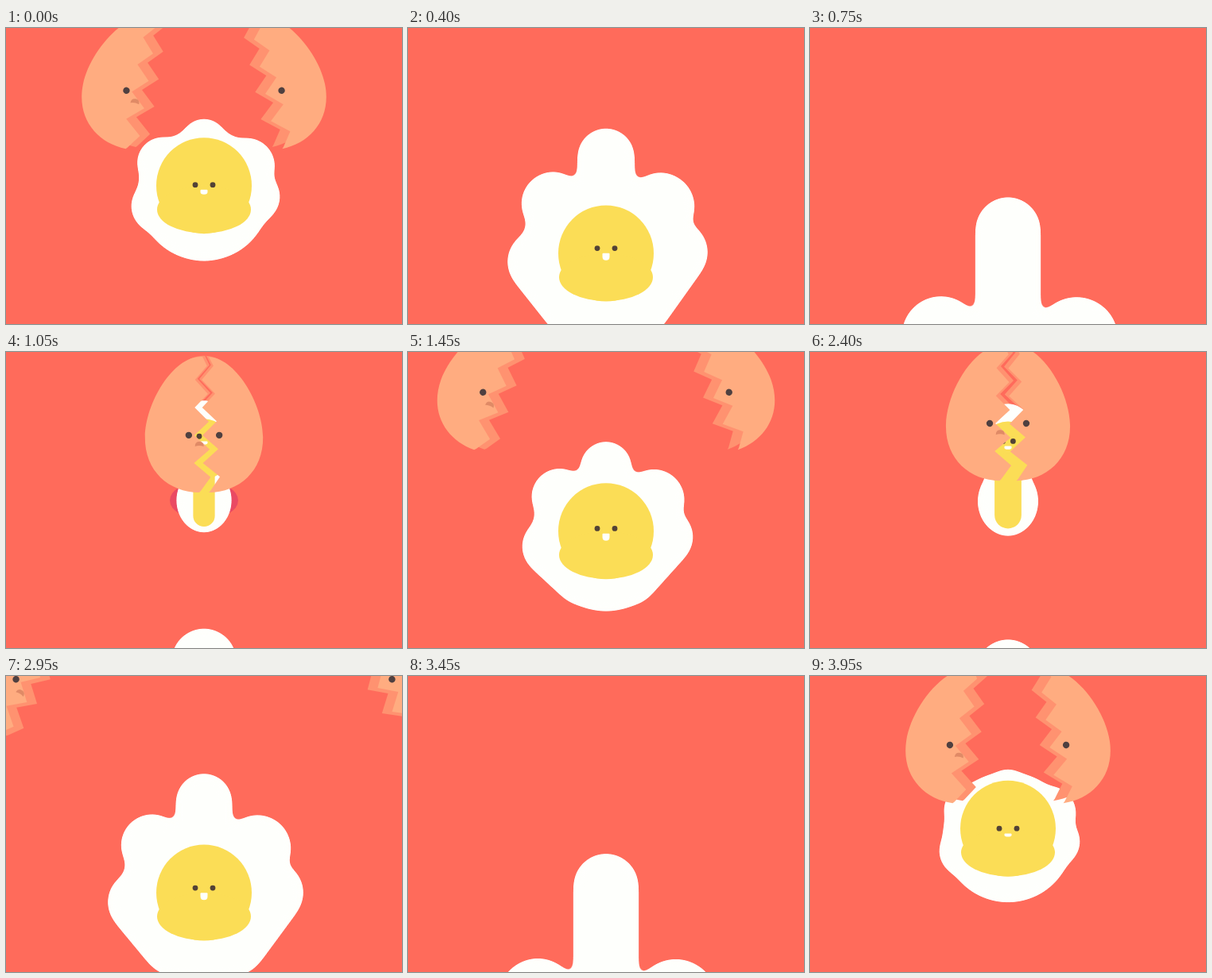
These frames come from a looping animation (498x373 px, 4000 ms). An HTML page:

```html
<!DOCTYPE html>
<html lang="en">
<head>
<meta charset="utf-8">
<title>Cracking egg</title>
<style>
  html, body { margin: 0; width: 100%; height: 100%; overflow: hidden; background: #ff6b5b; }
  svg { display: block; width: 100vw; height: 100vh; }
</style>
</head>
<body>
<svg viewBox="0 0 498 373">
  <defs>
    <filter id="goo" filterUnits="userSpaceOnUse" x="-40" y="-40" width="578" height="470" color-interpolation-filters="sRGB">
      <feGaussianBlur stdDeviation="7"/>
      <feColorMatrix values="1 0 0 0 0  0 1 0 0 0  0 0 1 0 0  0 0 0 20 -9.5"/>
    </filter>
  </defs>
  <g id="backBand"></g>
  <g id="flash"></g>
  <g id="white" filter="url(#goo)" fill="#fefffc" stroke="#fefffc" stroke-width="0" stroke-linejoin="round"></g>
  <g id="yolk"></g>
  <g id="shell"></g>
</svg>
<script>
const PERIOD = 4000 / 3, START = -600, CX = 249;
const CRACKED = -305, DROPPED = -50;

// Key points [time, value]; time 0 is when the egg has left the open shell.
const SHELL_Y = [[-560, -130], [-320, 108], [-283, 105], [-267, 90], [-50, 87], [0, 79], [300, 0]];
const GROWTH = [[-50, -.12], [0, 0], [283, .7], [400, .77], [467, 1], [1050, 2.48], [1110, 2.75]];

const $ = id => document.getElementById(id);
const clamp = (v, lo, hi) => Math.min(hi, Math.max(lo, v));
const mix = (a, b, t) => a.map((v, i) => v + (b[i] - v) * t);

// Monotone cubic through key points, constant outside them
function at(t, keys) {
  const last = keys.length - 1;
  if (t <= keys[0][0]) return keys[0][1];
  if (t >= keys[last][0]) return keys[last][1];
  const secant = j => (keys[j + 1][1] - keys[j][1]) / (keys[j + 1][0] - keys[j][0]);
  const slope = j => {
    const p = secant(Math.max(0, j - 1)), q = secant(Math.min(last - 1, j));
    return p * q > 0 ? 2 * p * q / (p + q) : 0;
  };
  const i = keys.findIndex(k => k[0] > t) - 1;
  const [t0, a] = keys[i], [t1, b] = keys[i + 1];
  const h = t1 - t0, s = (t - t0) / h, m = slope(i) * h, n = slope(i + 1) * h;
  return a + s * (m + s * (3 * (b - a) - 2 * m - n + s * (m + n - 2 * (b - a))));
}

const ellipse = (x, y, rx, ry, fill) =>
  `<ellipse cx="${x}" cy="${y}" rx="${rx}" ry="${ry}"${fill ? ` fill="${fill}"` : ''}/>`;
const dot = (x, y, r, fill) => ellipse(x, y, r, r, fill);
const line = (x1, y1, x2, y2, w) => `<path d="M${x1} ${y1}L${x2} ${y2}" stroke-width="${w}"/>`;

// The egg's pose: u is how far it has spread and fallen, out is how far it has left the shell
function pose(p) {
  const u = at(p, GROWTH), out = Math.min(1, (p + 283) / (DROPPED + 283));
  const y = 198.5 + 60 * u + 66 * u * u, r = 83 + 7 * Math.min(u, 1);
  const body = [y + 12 + 11 * u, r, r];
  return {
    u, out, y,
    body: mix([187, 35, 41], body, out),
    inner: mix([110, 34, 50], body, out),
    yolk: mix([122, 34, 38], [y, 60, 60.5], out),
    drip: mix([13.5, 220], [59, y + 60], out),
    face: mix([106, 6], [y - 1 - 7 * u, 11], out),
  };
}

function drawWhite(p) {
  if (p < CRACKED || p > 1110) return '';
  const { u, out, y, body, inner } = pose(p), scale = clamp(out, 0, 1);
  let svg = ellipse(CX, ...body) + ellipse(CX, ...inner);
  if (!scale) return svg;

  const place = (dx, dy, r) => [CX + dx * scale, y + dy * scale, r * scale];
  const upper = side => place(side * (53 + 19 * u) + 1, -27 - 44 * u + 2 * side, 34 + 10 * u + 1.5 * side);
  const lower = side => place(side * (60 + 33 * u) + 2, 20 - 20 * u - 6 * side, 34 + 9 * u);
  const lobes = [upper(-1), upper(1), lower(1), lower(-1)];
  svg += lobes.map(l => dot(...l)).join('');
  svg += `<polygon points="${lobes.map(l => l.slice(0, 2))}" stroke-width="${54 * scale}"/>`;

  const radius = 30 + 8 * Math.min(u, 1.4), headY = y - 84.5 - 80 * u - 20 * u * u + radius;
  svg += dot(CX, headY, radius * scale) + line(CX, headY, CX, lobes[0][1] + 10, 2 * radius * scale);

  for (const [x, ly, r] of lobes.slice(2)) {
    const bx = CX + Math.sign(x - CX) * (20 + 25 * u) * scale, by = body[0] + (38 + 10 * u) * scale;
    svg += line(x, ly, bx, by, 2 * r) + dot(bx, by, r);
  }
  return svg;
}

function drawYolk(p) {
  if (p < CRACKED || p > 700) return '';
  const { u, yolk, drip: [w, bottom], face: [eyeY, spread] } = pose(p);
  const fill = '#fbdd56', ink = '#524236';
  const size = clamp(6 + 15 * u, 4, 9), c = size / 2, top = eyeY + 6.2;
  return ellipse(CX, ...yolk, fill)
    + `<rect x="${CX - w}" y="${yolk[0]}" width="${2 * w}" height="${bottom - yolk[0]}" rx="${w}" fill="${fill}"/>`
    + dot(CX - spread, eyeY, 3.4, ink) + dot(CX + spread, eyeY, 3.4, ink)
    + `<path d="M${CX - 4.5} ${top + 1}q0-1 1-1h7q1 0 1 1v${size - c - 1}q0 ${c}-4.5 ${c}t-4.5-${c}z" fill="#fefffc"/>`;
}

// Zigzag from the bottom of the shell to its top, relative to the eye line
const crack = Array.from({ length: 11 }, (_, i) =>
  `L${i % 10 ? (i % 2 ? 7 + .8 * i : -7) : 2} ${Math.max(-99, 17.5 * i - 105)}`).reverse().join('');

function half(side) {
  const x = side * 69;
  return `M0-99C${side * 35}-99 ${x}-40 ${x} 3C${x} 46 ${side * 38} 72 0 72${crack}Z`;
}

function drawShell(p) {
  const y = at(p, SHELL_Y);
  const gap = Math.max(0, 5 + .23 * (p + 283)) + .26 * Math.max(0, p - DROPPED);
  const shift = Math.min(12, gap * .6);
  let bands = '', halves = '';
  for (const side of [-1, 1]) {
    const open = `<g transform="translate(${CX + side * gap} ${y}) rotate(${-side * gap * .14} ${side * 14} 0)">`;
    const path = half(side);
    bands += `${open}<path d="${path}" transform="translate(${-side * shift} ${-shift * .4})" fill="#ff9270"/></g>`;
    halves += `${open}<path d="${path}" fill="#ffac80"/>${dot(side * 14, 0, 4.2, '#4f4040')}`;
    if (side < 0) halves += '<path d="M-6 14q0-6 5.500-6t5.500 6q-5.500-2-11 0z" fill="#e08a66"/>';
    halves += '</g>';
  }
  return [bands, halves];
}

function frame() {
  const p = (performance.now() - START) % PERIOD + START;
  const [bands, halves] = drawShell(p), closed = p < -200;
  $('backBand').innerHTML = closed ? bands : '';
  $('flash').innerHTML = p > CRACKED && p < -270 ? ellipse(CX, 187, 43, 24, '#ea4a63') : '';
  $('white').innerHTML = drawWhite(p + PERIOD) + drawWhite(p);
  $('yolk').innerHTML = drawYolk(p);
  $('shell').innerHTML = (closed ? '' : bands) + halves;
  requestAnimationFrame(frame);
}
frame();
</script>
</body>
</html>
```
